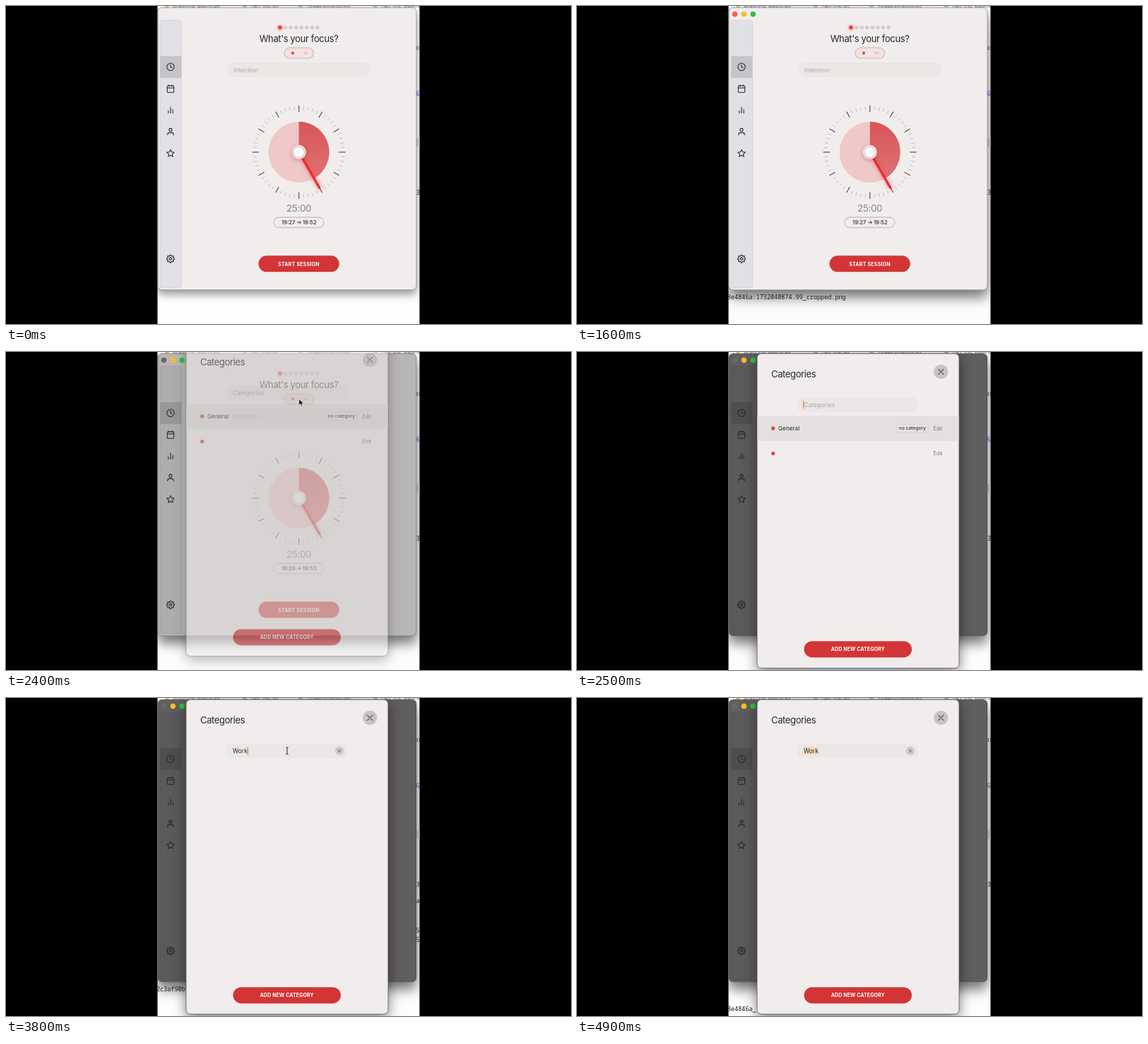
An HTML page that plays this animation: 800x450 px, repeating every 5000 ms.

```html
<!DOCTYPE html>
<html lang="en">
<head>
<meta charset="utf-8">
<title>Focus timer</title>
<style>
  html, body { margin: 0; width: 100%; height: 100%; overflow: hidden; background: #000; }
  svg { display: block; width: 800px; height: 450px; font-family: Inter, "Open Sans", sans-serif; }
  text { white-space: pre; }
  .mono { font: 8.48px "Noto Sans Mono", "DejaVu Sans Mono", monospace; fill: #1c1c1e; }
  .tab { font-size: 7.9px; fill: #55555c; }
  .mid { text-anchor: middle; }
  .head { font-size: 13px; letter-spacing: -.36px; fill: #2a2727; }
  .cta { font-size: 7px; font-weight: 700; fill: #fff; text-anchor: middle; }
  .icon { fill: none; stroke: #262528; stroke-width: 2; stroke-linecap: round; stroke-linejoin: round; }
</style>
</head>
<body>
<svg id="stage" viewBox="0 0 800 450"></svg>
<script>
const LOOP = 5000;
const RED = '#d33536', PAPER = '#f1edec', FIELD = '#ebe7e6';
const DIAL = { x: 414.7, y: 206.8 };

const box = (x, y, w, h, r, fill, extra = '') =>
  `<rect x="${x}" y="${y}" width="${w}" height="${h}" rx="${r}" fill="${fill}" ${extra}/>`;
const dot = (x, y, r, fill, extra = '') =>
  `<circle cx="${x}" cy="${y}" r="${r}" fill="${fill}" ${extra}/>`;
const label = (x, y, str, attrs = '') => `<text x="${x}" y="${y}" ${attrs}>${str}</text>`;
const line = (d, color, width, extra = '') =>
  `<path d="${d}" fill="none" stroke="${color}" stroke-width="${width}" stroke-linecap="round" stroke-linejoin="round" ${extra}/>`;
const cross = (x, y, s, color, width) =>
  line(`M${x - s} ${y - s}L${x + s} ${y + s}M${x + s} ${y - s}L${x - s} ${y + s}`, color, width);
const range = n => [...Array(n).keys()];

// Angle in degrees, clockwise from twelve o'clock
function polar(deg, r, c = DIAL) {
  const a = deg * Math.PI / 180;
  return (c.x + r * Math.sin(a)).toFixed(2) + ' ' + (c.y - r * Math.cos(a)).toFixed(2);
}

function gear() {
  const c = { x: 12, y: 12 };
  const pts = range(96).map(i => {
    const wave = Math.cos(i / 96 * Math.PI * 16);
    return polar(i * 3.75, 9.3 + 1.5 * Math.tanh(2.5 * wave), c);
  });
  return `<path d="M${pts.join('L')}Z"/><circle cx="12" cy="12" r="3.2"/>`;
}

function star() {
  const c = { x: 12, y: 12.6 };
  return `<path d="M${range(10).map(i => polar(i * 36, i % 2 ? 5 : 10.6, c)).join('L')}Z"/>`;
}

function sidebar() {
  const icons = [
    [86.3, '<circle cx="12" cy="12" r="10"/><path d="M12 6v6l4 2"/>'],
    [117, '<rect x="3" y="4" width="18" height="18" rx="2"/><path d="M16 2v4M8 2v4M3 10h18"/>'],
    [147.3, '<path d="M18 20V10M12 20V4M6 20v-6"/>'],
    [177.8, '<path d="M20 21v-2a4 4 0 0 0-4-4H8a4 4 0 0 0-4 4v2"/><circle cx="12" cy="7" r="4"/>'],
    [208.4, star()],
    [357.8, gear()]
  ];
  return icons.map(([y, body]) =>
    `<g class="icon" transform="translate(233 ${y}) scale(.52) translate(-12 -12)">${body}</g>`).join('');
}

function dial() {
  const ticks = range(60).map(i => {
    const major = i % 5 === 0;
    return `<path d="M${polar(i * 6, major ? 56.7 : 60)}L${polar(i * 6, major ? 66 : 64.8)}"
      stroke="${major ? '#565254' : '#bdb8b8'}" stroke-width="${major ? 1.2 : .9}"/>`;
  }).join('');
  const { x, y } = DIAL;
  const hand = `M${x} ${y}L${polar(150, 58)}`;
  return ticks + dot(x, y, 43, '#efc8c8') +
    `<path d="M${x} ${y}L${polar(0, 43)}A43 43 0 0 1 ${polar(150, 43)}Z" fill="url(#wedge)"/>` +
    line(hand, '#f04040', 6, 'opacity=".38" filter="url(#blur)"') +
    line(hand, '#ee2b30', 3.4) +
    dot(x, y + 1.5, 10, '#a03030', 'opacity=".4" filter="url(#blur)"') +
    dot(x, y, 10.2, '#f0dcdb') + dot(x, y, 7.5, '#fbfafa', 'stroke="#cfc4c4" stroke-width=".8"');
}

function mainView() {
  const dots = range(7).map(i => dot(395.6 + 7.58 * i, 30.5, 2.7, '#d2cdcd')).join('');
  return dot(388, 30.5, 4.6, '#f3bcbb', 'filter="url(#soft)"') + dot(388, 30.5, 2.8, '#df4848') + dots +
    label(414.6, 51, "What's your focus?", 'class="head mid"') +
    box(394, 59.2, 41.5, 15, 7.5, '#f2e2e1', 'id="pick" stroke="#d0bfbf" stroke-width="1.3"') +
    dot(406, 66.7, 2.1, '#df4a48') +
    line('M421.7 65.6L424.2 68L426.7 65.6', '#df7e7c', 1, 'id="chevron"') +
    box(313.5, 80, 202.5, 20.5, 9, FIELD) +
    label(322, 93.6, 'Intention', 'font-size="8.6" fill="#b0abab"') +
    dial() +
    label(414.6, 291, '25:00', 'class="mid" font-size="13.5" letter-spacing="-.35" fill="#898485"') +
    box(379, 299, 71, 14.5, 7.2, PAPER, 'stroke="#c9c4c4" stroke-width="1.3"') +
    '<g font-size="7.5" font-weight="600" fill="#454142">' +
    label(390, 308.9, '', 'id="from"') + label(439.6, 308.9, '', 'id="to" text-anchor="end"') + '</g>' +
    line('M412.4 306.2H417.4M415.4 304.2L417.4 306.2L415.4 308.2', '#454142', 1) +
    box(357.5, 353.3, 114.3, 23, 11.5, RED) +
    label(414.6, 367.5, 'START SESSION', 'class="cta" letter-spacing=".25"');
}

function modalView() {
  return box(255, 2.3, 286, 445, 6, PAPER, 'stroke="#5a5757" stroke-width=".8"') +
    label(275, 35.5, 'Categories', 'class="head"') +
    dot(515.3, 28, 10.2, '#c8c4c4') + cross(515.3, 28, 3.7, '#545152', 1.2) +
    box(311.5, 64.5, 172, 20.8, 9, FIELD) +
    box(321, 69, 0, 11.4, 0, '#f6d8bb', 'id="mark"') +
    label(321, 78, 'Categories', 'id="hint" font-size="8.6" fill="#aaa5a4"') +
    label(321, 78, '', 'id="typed" font-size="8.4" fill="#2b2828"') +
    box(320, 69, 1.3, 11.4, 0, '#e08c42', 'id="caret"') +
    `<g id="clear">${dot(472, 74.8, 6.2, '#d0cbcb')}${cross(472, 74.8, 1.9, '#676364', .9)}</g>` +
    '<g id="list">' + box(255.4, 90.5, 285.2, 35.3, 0, '#e4e0df') +
    dot(277.7, 108, 2.7, '#d84b49') + dot(277.7, 143.6, 2.7, '#d84b49') +
    label(285, 111, 'General', 'font-size="8.2" fill="#2b2828"') +
    box(452.7, 102.3, 44.6, 11.4, 1, '#e9e5e4', 'stroke="#d2cdcc" stroke-width=".8"') +
    label(475, 110.3, 'no category', 'class="mid" font-size="6.6" font-weight="600" fill="#4b4748"') +
    [110.5, 146.1].map(y => label(504.8, y, 'Edit', 'font-size="7.1" fill="#787374"')).join('') + '</g>' +
    box(321.5, 409.2, 152.5, 23, 11.5, RED) +
    label(397.8, 423.4, 'ADD NEW CATEGORY', 'class="cta" letter-spacing=".12"');
}

const tabs = [[236, 'ordering_agent.py'], [347, 'run_me.sh'], [427, 'requirements.txt'], [532, 'run_me_bulk.sh']];
const stage = document.getElementById('stage');

stage.innerHTML = `
<defs>
  <clipPath id="screen"><rect x="214.5" y="0" width="371" height="450"/></clipPath>
  <linearGradient id="wedge" x1="0" y1="0" x2="0" y2="1">
    <stop offset="0" stop-color="#d95558"/><stop offset="1" stop-color="#de7273"/>
  </linearGradient>
  <filter id="blur" x="-60%" y="-60%" width="220%" height="220%"><feGaussianBlur stdDeviation="3"/></filter>
  <filter id="soft" x="-60%" y="-60%" width="220%" height="220%"><feGaussianBlur stdDeviation="1"/></filter>
</defs>
<rect width="800" height="450" fill="#000"/>
<g clip-path="url(#screen)">
  ${box(214, 0, 372, 450, 0, '#fdfcfe')}
  ${box(580, 187, 6, 12, 0, '#dedde2')}
  ${tabs.map(([x, s]) => label(x, 2.2, s, 'class="tab"')).join('')}
  ${dot(228, -.6, 3, '#f2b552')}
  ${[338, 417, 523].map(x => box(x - 3, -3, 6, 4.5, 1, '#a5a5ac')).join('')}
  ${label(578.5, 62.2, 'or', 'class="mono"')}
  ${label(580.5, 126.8, '60', 'class="mono" style="fill:#3a48d8"')}
  ${label(581, 267.2, '3', 'class="mono"')}
  <g id="extra">
    ${[['a', 290], ['5', 332], ['5', 345.4]].map(([s, y]) => label(580.5, y, s, 'class="mono"')).join('')}
  </g>
  <g id="win">
    ${box(215, 2.3, 366, 399.5, 6, PAPER, 'stroke="#8d8a8b" stroke-width=".8"')}
    ${box(218, 20.3, 30.5, 378.5, 3, '#e1e0e4', 'stroke="#d1d0d3" stroke-width=".8"')}
    ${box(218, 71, 30.3, 30.8, 0, '#c6c4c7')}
    ${mainView()}
    ${box(215, 2.3, 366, 399.5, 6, '#000', 'id="dim"')}
    ${sidebar()}
  </g>
  <g id="lights">
    ${dot(223.5, 11.6, 3.8, '#fb5d56', 'id="close"')}${dot(236.4, 11.6, 3.8, '#fabb2f')}${dot(249.2, 11.6, 3.8, '#2bc440')}
  </g>
  <g id="log">${range(2).map(i => label(213, 0, '', `class="mono" id="log${i}"`)).join('')}</g>
  <g id="modal" style="filter:drop-shadow(0 6px 9px rgba(0,0,0,.5))">${modalView()}</g>
  <path id="arrow" d="M0 0V9.2L2.1 7.3L3.6 10.6L5.1 9.9L3.7 6.8H6.6Z" fill="#0a0a0a" stroke="#fff" stroke-width=".7"/>
  <path id="beam" d="M-1.8 -5Q0 -5 0 -3.6Q0 -5 1.8 -5M0 -3.6V3.6M-1.8 5Q0 5 0 3.6Q0 5 1.8 5"
    fill="none" stroke="#2a2828" stroke-width="1"/>
</g>`;

const el = {};
stage.querySelectorAll('[id]').forEach(n => el[n.id] = n);

const show = (node, on) => node.setAttribute('display', on ? 'inline' : 'none');
const set = (node, attrs) => { for (const k in attrs) node.setAttribute(k, attrs[k]); };
const clamp = v => Math.min(1, Math.max(0, v));
const easeOut = v => 1 - (1 - clamp(v)) ** 2;
const mix = (a, b, k) => a + (b - a) * k;

const HASH = '2c3af90bf1a1e8e4846a';
const SHOT = '8e4846a:1732040874.99_cropped.png';
const SEGMENT = HASH + ':1732040874.99_cropped_segmented.png';

// Visible terminal lines as [baseline, text]
function logLines(t) {
  if (t < 1400) return [];
  if (t < 2300) return [[415, SHOT]];
  if (t < 2400) return [[415, SHOT], [429, SEGMENT]];
  if (t < 2900) return [];
  if (t < 3500) return [[443, SEGMENT]];
  if (t < 3700) return [[429, SEGMENT]];
  if (t < 4000) return [[415, SEGMENT]];
  if (t < 4700) return [[443, SEGMENT]];
  return [[443, '8e4846a_1732040874.99_cropped.png']];
}

function draw(now) {
  const t = Math.floor(now % LOOP / 100) * 100;
  const focused = t >= 400, open = t >= 2400, settled = t >= 2500;

  el.win.style.filter = focused
    ? 'drop-shadow(0 10px 9px rgba(0,0,0,.55))'
    : 'drop-shadow(0 6px 6px rgba(0,0,0,.4))';
  show(el.lights, focused);
  el.close.setAttribute('fill', open ? '#6a6869' : '#fb5d56');
  el.dim.setAttribute('opacity', settled ? .6 : open ? .23 : 0);

  el.from.textContent = open ? '19:28' : '19:27';
  el.to.textContent = open ? '19:53' : '19:52';
  const hover = t >= 2100;
  el.pick.setAttribute('fill', hover ? '#eddcdc' : '#f2e2e1');
  el.chevron.setAttribute('stroke', hover ? '#b09a9b' : '#df7e7c');

  const lines = logLines(t);
  range(2).forEach(i => {
    const [y, str] = lines[i] || [0, ''];
    el['log' + i].textContent = str;
    el['log' + i].setAttribute('y', y);
  });
  show(el.extra, t >= 3500 && t < 4500);

  show(el.modal, open);
  set(el.modal, { transform: `translate(0 ${settled ? 0 : -17})`, opacity: settled ? 1 : .55 });

  const typed = 'Work'.slice(0, [2900, 3000, 3200, 3300].filter(k => t >= k).length);
  const selected = t >= 4700;
  el.typed.textContent = typed;
  const width = typed && open ? el.typed.getComputedTextLength() : 0;
  show(el.hint, !typed);
  show(el.list, !typed);
  show(el.clear, typed);
  show(el.caret, settled && !selected);
  el.caret.setAttribute('x', 320 + (width ? width + 1 : 0));
  el.mark.setAttribute('width', selected ? width : 0);

  const reach = easeOut((t - 1800) / 300);
  show(el.arrow, t >= 1900 && t < 2500);
  el.arrow.setAttribute('transform', `translate(${mix(490, 414.8, reach)} ${mix(165, 66.3, reach)})`);

  const slide = easeOut((t - 3400) / 300);
  show(el.beam, t >= 3500 && t < 4400);
  el.beam.setAttribute('transform', `translate(${mix(412, 398, slide)} ${mix(71, 74.8, slide)})`);
}

const start = performance.now();
function tick() {
  draw(performance.now() - start);
  requestAnimationFrame(tick);
}
tick();
</script>
</body>
</html>
```
